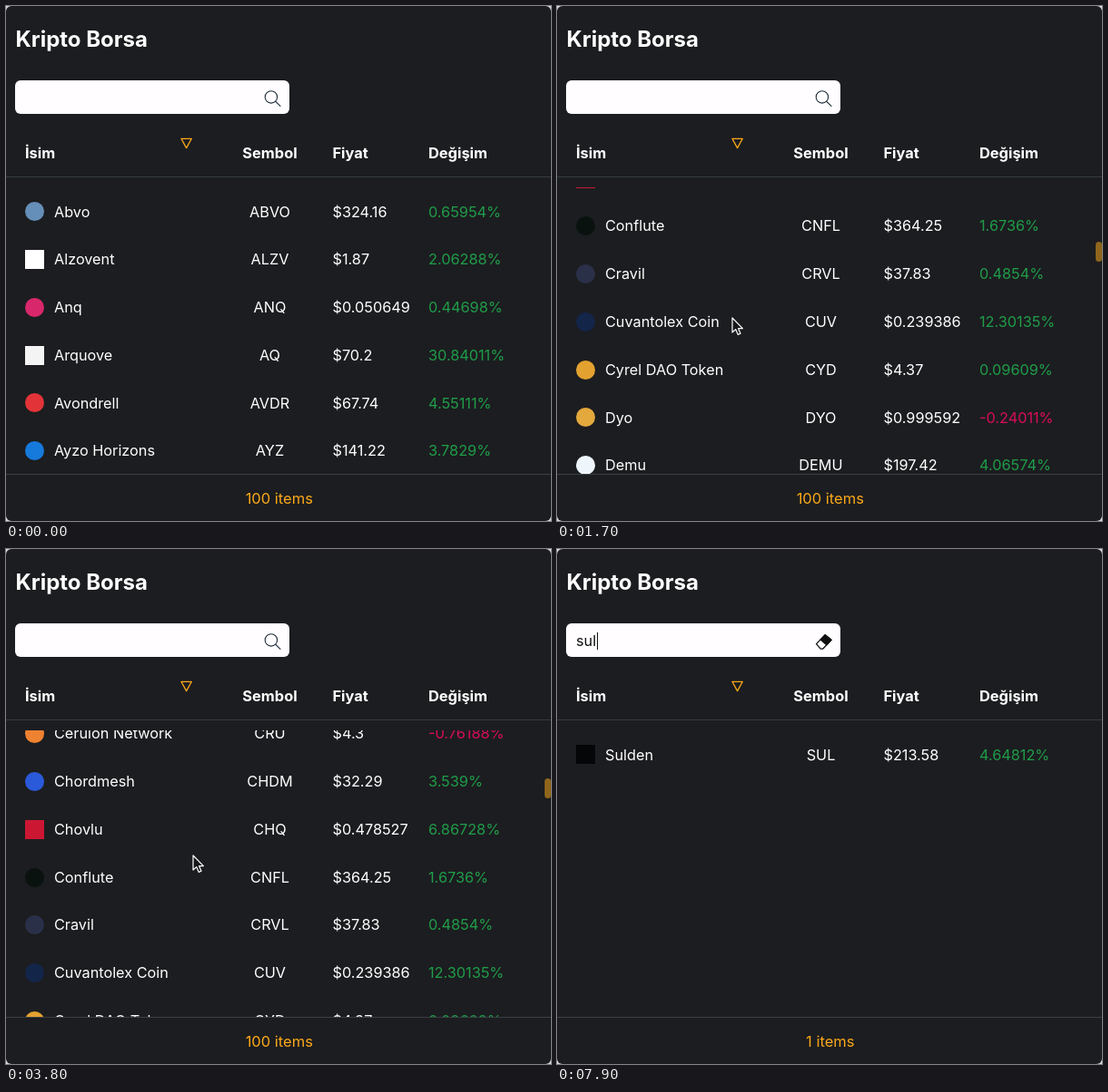
An HTML page for the animation above (8 s loop, 600x568 px).

```html
<!DOCTYPE html>
<html lang="tr">
<head>
<meta charset="utf-8">
<title>Kripto Borsa</title>
<style>
  html, body { margin: 0; width: 100%; height: 100%; overflow: hidden; background: #d8d9db; }
  #app {
    position: relative; width: 600px; height: 568px; overflow: hidden;
    background: #1c1d20; border-radius: 6px; color: #fff;
    font: 16.25px/20px Inter, "Liberation Sans", sans-serif;
  }
  #app > * { position: absolute; }
  h1 { margin: 0; left: 10.5px; top: 21px; font-size: 24px; line-height: 32px; font-weight: 700; white-space: nowrap; }
  #search { left: 10.4px; top: 81.8px; width: 301.3px; height: 37.6px; border-radius: 6px; background: #fffdff; }
  #typed { left: 21px; top: 91px; color: #111; white-space: pre; }
  #caret { display: inline-block; width: 1.4px; height: 19px; margin-left: .5px; background: #111; vertical-align: -4px; }
  .icon { left: 283px; top: 91px; }
  .head { top: 152px; font-weight: 700; font-size: 16.4px; }
  .line { left: 0; width: 600px; height: 1px; background: #343d45; }
  #list { left: 0; top: 199.5px; width: 600px; height: 317px; overflow: hidden; }
  #rows { position: relative; padding-top: 1px; }
  .row { position: relative; height: 52.78px; line-height: 53.4px; }
  .row > * { position: absolute; top: 0; white-space: nowrap; }
  .row .logo { left: 21px; top: 15.8px; width: 21.1px; height: 21.1px; }
  .name { left: 53px; }
  .sym { left: 240px; width: 101px; text-align: center; }
  .price { left: 359.5px; width: 95.5px; overflow: hidden; }
  .change { left: 465px; color: #1f9d49; }
  .change.down { color: #d90d5c; }
  #thumb { left: 592.5px; top: 201.5px; width: 7.5px; height: 22px; border-radius: 4px; background: rgba(252, 170, 24, .52); }
  #count { left: 0; top: 533px; width: 601.5px; text-align: center; font-size: 16.5px; color: #fba919; }
  .cursor { left: 0; top: 0; overflow: visible; }
</style>
</head>
<body>
<div id="app">
  <h1>Kripto Borsa</h1>
  <div id="search"></div>
  <div id="typed"><span id="text"></span><span id="caret"></span></div>
  <svg class="icon" id="lens" width="22" height="22" fill="none" stroke="#1d2b3a" stroke-width="1.1" stroke-linecap="round">
    <circle cx="8.9" cy="9.4" r="6.7"/><path d="M13.8 14.3L19 19.4"/>
  </svg>
  <svg class="icon" id="eraser" width="22" height="22" stroke="#111" stroke-width="1.3" stroke-linejoin="round">
    <path d="M2.5 13.6L12.2 3.8L19 9.3L9.6 19.2H7.2Z" fill="none"/>
    <path d="M7.2 9L12.2 3.8L19 9.3L13.8 14.7Z" fill="#111"/>
  </svg>
  <b class="head" style="left:21px">İsim</b>
  <b class="head" style="left:240px;width:101px;text-align:center">Sembol</b>
  <b class="head" style="left:359.5px">Fiyat</b>
  <b class="head" style="left:465px">Değişim</b>
  <svg style="left:191px;top:144px" width="16" height="16" fill="none" stroke="#fba919" stroke-width="1.3" stroke-linejoin="round">
    <path d="M1.9 2.3H13.3L7.6 12.6Z"/>
  </svg>
  <div class="line" style="top:188px"></div>
  <div id="list"><div id="rows"></div></div>
  <div id="thumb"></div>
  <div class="line" style="top:516px;background:#3a4045"></div>
  <div id="count"></div>
  <svg class="cursor" id="arrow" width="16" height="22">
    <path d="M0 0V16L3.7 12.6L6.3 18.4L9 17.2L6.5 11.6H11.4Z" fill="#17181a" stroke="#fff" stroke-width="1.2" stroke-linejoin="round"/>
  </svg>
  <svg class="cursor" id="hand" width="18" height="22">
    <path d="M-1.6 1.2C-1.6-.6 1-.6 1.2 1.2L2 6.4C2.6 5.3 4.4 5.6 4.5 6.8C5.2 5.9 6.9 6.3 7 7.5C8.2 6.9 9.2 7.7 9.2 9V12.5C9.2 14.4 8 15.3 7.8 17.6H-.2C-.6 15.2-3 13.2-5.2 10.2C-5.8 8.8-4 8.1-2.9 9.2L-.9 10.9Z" fill="#fff" stroke="#17181a" stroke-linejoin="round"/>
    <path d="M1.6 11.5V15M4 11.5V15M6.3 11.5V15" stroke="#17181a"/>
  </svg>
  <svg class="cursor" id="beam" width="10" height="20">
    <path d="M-3-8Q0-8 0-6Q0-8 3-8M0-6V6M-3 8Q0 8 0 6Q0 8 3 8" fill="none" stroke="#222" stroke-width="1.1"/>
  </svg>
</div>
<script>
  // name | symbol | price | change | badge colour | s = square badge
  const coins = `Abvo|ABVO|$324.16|0.65954%|#658fb8
Alzovent|ALZV|$1.87|2.06288%|#fff|s
Anq|ANQ|$0.050649|0.44698%|#d9276b
Arquove|AQ|$70.2|30.84011%|#f4f4f4|s
Avondrell|AVDR|$67.74|4.55111%|#e23438
Ayzo Horizons|AYZ|$141.22|3.7829%|#1679dc
Brisk Curiosity Token|BQT|$1.03|2.96703%|#d9472f
Bivonda Coin|BVD|$561.68|3.65526%|#efaf30
Bivonda USD|BVUS|$1|-0.15914%|#efaf30
BloTressel|BLT|$0.0040944|2.11848%|#bdbdbd
Bloqado|BQD|$63280|2.65009%|#f38a1d
Bloqado Mint|BQM|$602.4|1.84206%|#8dc351
Bloqado LX|BQX|$168.9|0.73115%|#eab300
Bloqado Q2|BQQ|$63251|2.59034%|#f0b42e
Cavdoni|CVD|$2.05|1.32077%|#2d5fc4
Cevu|CEVU|$5.64|2.48106%|#4fcf86
Cerulon Network|CRU|$4.3|-0.76188%|#ee8230
Chordmesh|CHDM|$32.29|3.539%|#2a5ada
Chovlu|CHQ|$0.478527|6.86728%|#cc1733|s
Conflute|CNFL|$364.25|1.6736%|#09120f
Cravil|CRVL|$37.83|0.4854%|#2b3049
Cuvantolex Coin|CUV|$0.239386|12.30135%|#14254a
Cyrel DAO Token|CYD|$4.37|0.09609%|#e3a22f
Dyo|DYO|$0.999592|-0.24011%|#e3a93c
Demu|DEMU|$197.42|4.06574%|#eef6fc
Delvoraplain|DLVO|$3.03|-2.21514%|#ee4b3d
Denrov|DNV|$113.03|0.90433%|#2b73ee
Dorlicot|DORL|$0.273322|0.68245%|#c5a545
EDUVI|EDV|$0.00682319|3.87477%|#151719
ELQ|ELQ|$4.73|2.4557%|#505357
Emvurd|EMVD|$275|1.56301%|#0e0f11
Envoq Coin|ENVQ|$2.68|1.20418%|#7254c8
Sulden|SUL|$213.58|4.64812%|#050608|s`.split("\n").map(s => s.split("|"));

  const $ = id => document.getElementById(id);
  $("rows").innerHTML = coins.map(([name, sym, price, change, color, shape]) => `<div class="row">
    <i class="logo" style="background:${color};border-radius:${shape ? 0 : "50%"}"></i>
    <span class="name">${name}</span><span class="sym">${sym}</span><span class="price">${price}</span>
    <span class="change${change[0] === "-" ? " down" : ""}">${change}</span></div>`).join("");
  const rows = [...$("rows").children];
  const found = rows[rows.length - 1];

  const LOOP = 8000, FILTER = 7100;
  const unit = v => Math.max(0, Math.min(1, v));
  const show = (el, on) => { el.style.display = on ? "" : "none"; };

  // Flick scrolling: exponential decay from start to end
  const flick = (t, start, end, k) => {
    const span = (end - start) / 1000, u = unit((t - start) / (end - start)) * span;
    return (1 - Math.exp(-k * u)) / (1 - Math.exp(-k * span));
  };
  const scrollAt = t => 1368 * flick(t, 1283, 2800, 2.99) - 1132.6 * flick(t, 3612, 4900, 3);

  // row, pointer in, pointer out
  const hovers = [[0, 740, 1130], [28, 2830, 3200], [5, 4850, 5030]];
  const fade = (t, on, off, ms) => unit((t - on) / ms) * (1 - unit((t - off) / ms));

  // time, x, y of the pointer tip
  const path = [[100, 300, 552], [600, 150, 146], [900, 116, 205], [1020, 116, 205], [1280, 193, 344],
    [1800, 193, 344], [2100, 206, 338], [4600, 206, 338], [4850, 126, 240], [4930, 126, 240], [5350, 100, 104]];
  const pointAt = t => {
    const i = path.findIndex(p => p[0] > t);
    if (i < 0) return path[path.length - 1].slice(1);
    if (i === 0) return path[0].slice(1);
    const [a, b] = [path[i - 1], path[i]];
    let p = (t - a[0]) / (b[0] - a[0]);
    p = p * p * (3 - 2 * p);
    return [a[1] + (b[1] - a[1]) * p, a[2] + (b[2] - a[2]) * p];
  };

  function render(t) {
    const filtered = t >= FILTER, y = filtered ? 0 : scrollAt(t);
    rows.forEach(r => { show(r, filtered === (r === found)); r.style.background = ""; });
    // Layout offset keeps the text on whole pixels
    $("rows").style.top = -y + "px";
    hovers.forEach(([i, on, off]) => {
      rows[i].style.background = `rgba(255,255,255,${0.2 * fade(t, on, off, 260)})`;
    });

    $("thumb").style.transform = `translateY(${y * 0.0587}px)`;
    $("thumb").style.opacity = fade(t, 940, 3250, 50) + fade(t, 3600, 5400, 50);
    $("count").textContent = (filtered ? 1 : 100) + " items";

    const typed = "sul".slice(0, (t >= 6100) + (t >= 6400) + (t >= 6900));
    $("text").textContent = typed;
    show($("caret"), t >= 5500 && Math.floor((t - 5500) / 500) % 2 === 0);
    show($("lens"), !typed);
    show($("eraser"), typed);

    const [px, py] = pointAt(t);
    const over = hovers.some(([, on, off]) => t >= on && t < off - 90);
    const kind = t < 100 || t >= 6100 ? "" : over ? "hand" : py < 119 ? "beam" : "arrow";
    for (const id of ["arrow", "hand", "beam"]) {
      show($(id), id === kind);
      $(id).style.transform = `translate(${px}px,${py}px)`;
    }
  }

  function tick() {
    render(performance.now() % LOOP);
    requestAnimationFrame(tick);
  }
  tick();
</script>
</body>
</html>
```
